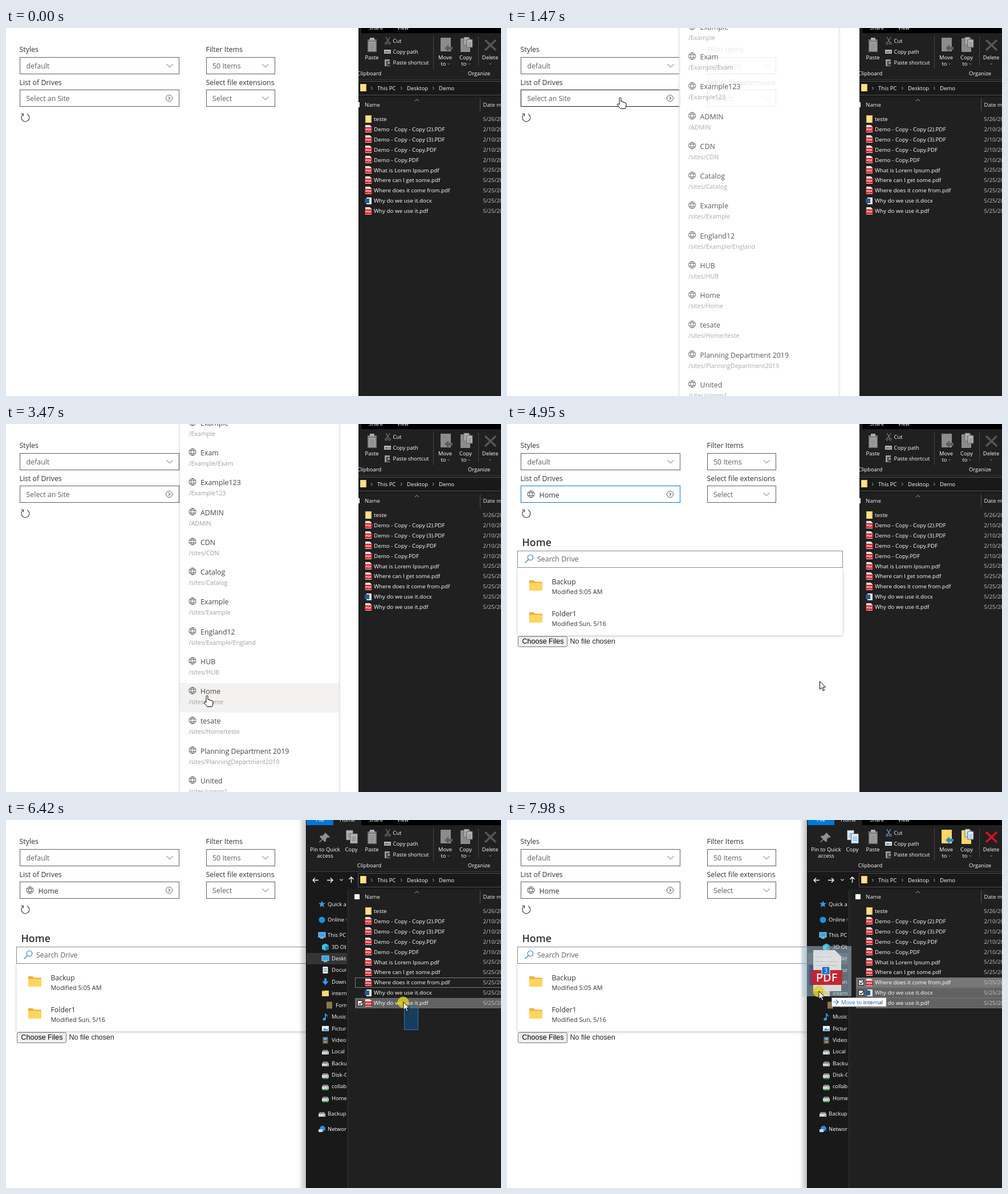
These frames come from a looping animation (868x645 px, 8000 ms). An HTML page:

```html
<!DOCTYPE html>
<html lang="en">
<head>
<meta charset="utf-8">
<style>
  html, body { margin: 0; width: 100%; height: 100%; overflow: hidden; background: #fff; }
  #stage { display: block; width: 868px; height: 645px; font-family: "Open Sans", "Noto Sans", sans-serif;
    --paper: #b4b4b4; --folder: #8c8c8c; --arrow: #5e5e5e; --cross: #565656; --tool: #858585; }
  #stage.enabled { --paper: #dcecf8; --folder: #ffd766; --arrow: #2b88d8; --cross: #d8131f; --tool: #6fb1e4; }
  text { white-space: pre; }
</style>
</head>
<body>
<svg id="stage" viewBox="0 0 868 645"></svg>
<script>
const LOOP = 8000;
const T = { appear: 330, press1: 1200, callout: 1400, press2: 3810, picked: 3900, listed: 4020,
  front: 6140, enabled: 6700, release: 7370, press3: 7600, drag: 7840, hint: 7950 };

// Baselines sit on whole pixels, as hinted screen text does.
const text = (x, y, s, size, fill, more = '') =>
  `<text x="${x}" y="${Math.round(y + size * .36)}" font-size="${size}" fill="${fill}" ${more}>${s}</text>`;
const rect = (x, y, w, h, fill, more = '') =>
  `<rect x="${x}" y="${y}" width="${w}" height="${h}" fill="${fill}" ${more}/>`;
const line = (d, stroke, w = 1, more = '') =>
  `<path d="${d}" fill="none" stroke="${stroke}" stroke-width="${w}" ${more}/>`;
const shape = (d, fill, more = '') => `<path d="${d}" fill="${fill}" ${more}/>`;
const circle = (x, y, r, fill, more = '') => `<circle cx="${x}" cy="${y}" r="${r}" fill="${fill}" ${more}/>`;
const group = (id, body, more = '') => `<g id="${id}" ${more}>${body}</g>`;
const at = (x, y, body) => `<g transform="translate(${x} ${y})">${body}</g>`;
const chevron = (x, y, r, color, w = 1) => line(`M${x - r} ${y - r / 2}l${r} ${r}l${r} ${-r}`, color, w);

// ---- file manager window ----
const ROW = 17.9, ROW0 = 159.5;
const files = ['teste', 'Demo - Copy - Copy (2).PDF', 'Demo - Copy - Copy (3).PDF', 'Demo - Copy - Copy.PDF',
  'Demo - Copy.PDF', 'What is Lorem Ipsum.pdf', 'Where can I get some.pdf', 'Where does it come from.pdf',
  'Why do we use it.docx', 'Why do we use it.pdf'];

const folderTile = (x, y) => rect(x, y, 11, 13, '#e8bf5a') + rect(x + 1, y + 1, 8, 12, '#ffe08c');
const pdfIcon = (x, y) => shape(`M${x + 1} ${y - 7}h8l3 3v10h-11z`, '#e4e4e4') +
  rect(x, y - 3, 13, 8, '#cf1820') +
  text(x + 6.5, y + 1, 'PDF', 5.6, '#fff', 'text-anchor="middle" font-weight="700"');
const docIcon = (x, y) => rect(x + 3, y - 6, 9, 12, '#e4e4e4') + rect(x, y - 4, 8, 8, '#2b579a');

function fileRow(name, i) {
  const y = ROW0 + i * ROW, iconY = Math.round(y);
  const icon = i === 0 ? folderTile(630, iconY - 7) : /docx/.test(name) ? docIcon(629, iconY) : pdfIcon(629, iconY);
  const mark = rect(616.5, iconY - 4.5, 9, 9, '#fff', 'stroke="#111"') + line(`M618.5 ${iconY}l2.200 2.300l4 -5`, '#111', 1.2);
  const date = i === 0 ? '5/26/2021' : i < 5 ? '2/10/2021' : '5/25/2021';
  return `<rect id="bg${i}" x="612.500" y="${Math.round(y - 9) + .5}" width="270" height="17"/>` +
    group('mark' + i, mark) + icon + text(645, y, name, 9.8, '#fff') + text(836.5, y, date, 9.6, '#c4c4c4');
}

const places = [[147.5, 'Quick access', 'star'], [175, 'Online files', 'dot'], [202, 'This PC', 'screen'],
  [222.5, '3D Objects', 'cube', 1], [243, 'Desktop', 'screen', 1], [263, 'Documents', 'page', 1],
  [283.5, 'Downloads', 'down', 1], [304, 'internal', 'folder', 1], [324.5, 'Formats', 'old', 2],
  [345, 'Music', 'note', 1], [365.5, 'Pictures', 'photo', 1], [386, 'Videos', 'film', 1],
  [406, 'Local Disk', 'disk', 1], [426.5, 'Backup', 'disk', 1], [447, 'Disk-C', 'net', 1],
  [467, 'collab', 'net', 1], [488, 'Home', 'net', 1], [515, 'Backup', 'disk'], [542, 'Network', 'globe']];
const drive = rect(-6, 0, 12, 5, '#d5d5d5') + shape('M-6 0l2 -3h8l2 3z', '#8d8d8d') + rect(3, 2, 2, 1.500, '#3a3');
const glyphs = {
  star: shape('M0 -6L1.700 -2H6L2.600 1L4 5.500L0 3L-4 5.500L-2.600 1L-6 -2H-1.700Z', '#3a9be8'),
  dot: circle(0, 0, 5.500, '#1e8fe0'),
  screen: rect(-6, -5, 12, 8.500, '#31a8f0', 'stroke="#9bd4f7"') + rect(-3, 4.500, 6, 1.500, '#ccc'),
  cube: shape('M0 -6L6 -3V4L0 6.500L-6 4V-3Z', '#3fc0e0') + shape('M0 0L6 -3V4L0 6.500Z', '#1583a8'),
  page: rect(-4.500, -6, 9, 12, '#e9eef2') + line('M-2.500 -2.500h5M-2.500 0h5M-2.500 2.500h5', '#3f86b8'),
  down: shape('M-2 -6h4v5h4L0 6L-6 -1h4z', '#3099ea'),
  folder: rect(-6, -5, 12, 10, '#ffd978') + rect(-6, -5, 5, 2, '#d9a73c'),
  old: rect(-5, -6, 10, 12, '#85794d'),
  note: circle(-2, 4, 2.600, '#2b9df0') + line('M0 4V-6Q1 -3 4 -1', '#2b9df0', 1.700),
  photo: rect(-6, -4.500, 12, 9, '#e6f3fa') + shape('M-5 3.500L-1 -1L2 2L4 0L5 3.500Z', '#3c92b8'),
  film: rect(-5, -6, 10, 12, '#555') + rect(-3, -4.500, 6, 4, '#7aa6d8') + rect(-3, 1, 6, 4, '#a5824c'),
  disk: drive,
  net: drive + line('M0 4v2M-5 6h10', '#37b24d', 1.500),
  globe: circle(1, -1, 5, '#2c8ae0') + rect(-6, 0, 7, 5, '#bcdcf5')
};
const place = ([y, label, kind, depth = 0]) =>
  at([554, 560, 567][depth], y, glyphs[kind]) + text([564, 571, 578][depth], y, label, 9.5, '#fff');

const mid = 'text-anchor="middle"';
const label = (x, y, s) => text(x, y, s, 9.4, '#fff', mid);
const sheet = (x, y, w, h) => rect(x, y, w, h, 'var(--paper)', 'stroke="#555" stroke-width=".8"') +
  line(`M${x + 2.500} ${y + 6}h${w - 5}m0 3h${5 - w}m0 3h${w - 5}`, 'var(--arrow)', .8);

const ribbon = rect(526, 0, 342, 9, '#000') + rect(526, 0, 48, 9, '#0078d7') + rect(574, 0, 49, 9, '#202020') +
  label(550.5, 0, 'File') + label(598.5, 0, 'Home') + label(648.5, 0, 'Share') + label(696, 0, 'View') +
  at(559, 31, shape('M1 -9l8 8l-2 1l-2 -.500l-3 3l0 4l-2 1l-4 -4l-5 5l-1 -1l5 -5l-4 -4l1 -2h4l3 -3z', '#909090')) +
  sheet(596.5, 18, 12, 17) + sheet(603.5, 24, 13, 17) +
  rect(634, 20, 16, 22, '#777') + rect(638, 17, 8, 5, '#aaa') + rect(636, 24, 12, 16, '#a2a2a2') +
  line('M638 28h8m0 3h-8m0 3h8m0 3h-8', '#777') +
  line('M666 16l6 10M673 16l-6 10', 'var(--tool)', 1.1) + circle(666.5, 27, 1.800, 'none', 'stroke="var(--tool)"') +
  circle(672.5, 27, 1.800, 'none', 'stroke="var(--tool)"') +
  rect(663, 38, 12, 7, 'var(--paper)') + line('M665 42h5m1 0h2', '#444', 1.5) +
  rect(664, 55, 9, 12, '#9a9a9a') + rect(667, 58, 7, 8, '#333') + line('M668 64l4 -4m-3 0h3v3', '#ddd') +
  text(678.5, 23, 'Cut', 9.4, '#fff') + text(678.5, 42, 'Copy path', 9.4, '#fff') +
  text(678.5, 60.5, 'Paste shortcut', 9.4, '#fff') +
  label(559.5, 52, 'Pin to Quick') + label(559.5, 63, 'access') + label(605.5, 52, 'Copy') + label(641.5, 52, 'Paste') +
  rect(762, 17, 18, 24, 'var(--folder)') + shape('M769 35l7 -6v4h7v5h-7v4z', 'var(--arrow)') +
  rect(797, 18, 17, 24, 'var(--folder)') + sheet(803, 16, 9, 14) + sheet(808, 20, 10, 14) +
  line('M840 21l19 18M859 21l-19 18', 'var(--cross)', 3.600) +
  label(770, 52, 'Move') + label(767, 63, 'to') + label(806, 52, 'Copy') + label(803, 63, 'to') + label(849, 52, 'Delete') +
  [776, 812, 849].map(x => chevron(x, 63, 1.500, '#aaa')).join('') +
  label(637, 80, 'Clipboard') + label(829.5, 80, 'Organize') +
  line('M749.5 13V72M828.5 15V66', '#454545');

const address = rect(526, 90, 342, 31, '#191919') + line('M526 90.5H868', '#3a3a3a') +
  rect(617.5, 93.5, 270, 24, '#191919', 'stroke="#505050"') +
  line('M548 105.5h-10m4 -4l-4 4l4 4M563 105.5h10m-4 -4l4 4l-4 4M605.5 110v-10m-4 4l4 -4l4 4', '#fff', 1.3) +
  chevron(588, 105, 2.500, '#ccc', 1.2) + folderTile(621, 98) +
  [641, 693, 749].map(x => line(`M${x - 1} 103l2.500 2.500l-2.500 2.500`, '#bbb')).join('') +
  text(651, 105.5, 'This PC', 9.65, '#fff') + text(703, 105.5, 'Desktop', 9.65, '#fff') + text(759, 105.5, 'Demo', 9.65, '#fff');

const explorer = rect(526, 0, 342, 645, '#202020') + ribbon + address +
  rect(526, 121, 73, 524, '#191919') + rect(526, 233, 72, 20, '#353535') + line('M599.5 124V645', '#353535') +
  `<svg width="597" height="645">${places.map(place).join('')}</svg>` +
  rect(611, 130, 9, 9, '#fff') + text(629, 135, 'Name', 9.6, '#eee') + text(836.5, 135, 'Date modified', 9.6, '#eee') +
  line('M717 128l3.500 -3l3.500 3', '#aaa') + line('M831.5 124V146', '#555') +
  files.map(fileRow).join('') +
  '<rect id="lasso" fill="#0078d7" fill-opacity=".33" stroke="#2b7cc4"/>' + line('M526.5 0V645', '#0c0c0c');

// ---- web page ----
const INK = '#323130', SOFT = '#605e5c', BORDER = '#605e5c';
const globe = (x, y) => at(x, y, circle(0, 0, 6, 'none', 'stroke="#555"') +
  line('M0 -6Q-5.500 0 0 6Q5.500 0 0 -6M-5.300 -2.500H5.300M-5.300 2.500H5.300', '#555', .9));
const box = (x, y, w, more = '') => rect(x + .5, y + .5, w - 1, 29, '#fff', `stroke="${BORDER}" ${more}`);
const folder = y => shape(`M39 ${y}h8l2 2.500h13v15h-23z`, '#e9b23d') + rect(39, y + 4.500, 23, 13.500, '#ffd45f', 'rx="1"');
const entry = (y, name, info) => folder(y - 3) + text(78.5, y, name, 12.3, INK) + text(78.5, y + 16.7, info, 10.9, INK);

const sites = [['Example', '/Example'], ['Exam', '/Example/Exam'], ['Example123', '/Example123'], ['ADMIN', '/ADMIN'],
  ['CDN', '/sites/CDN'], ['Catalog', '/sites/Catalog'], ['Example', '/sites/Example'],
  ['England12', '/sites/Example/England'], ['HUB', '/sites/HUB'], ['Home', '/sites/Home'],
  ['tesate', '/sites/Home/teste'], ['Planning Department 2019', '/sites/PlanningDepartment2019'], ['United', '/sites/comm1']];
const SITE = 52.25, SITE0 = -1.7;
const siteRow = ([name, path], i) => {
  const y = SITE0 + i * SITE;
  return globe(327, y - 1.300) + text(341, y, name, 12.4, '#484644') + text(320.5, y + 18.8, path, 10.7, '#a19f9d');
};

const windowShadow = '<linearGradient id="fade"><stop stop-opacity="0"/><stop offset="1" stop-opacity=".24"/></linearGradient>' +
  rect(513, 0, 13, 645, 'url(#fade)', 'id="shadow"');

const page = rect(0, 0, 618, 645, '#fff') +
  text(23.5, 38, 'Styles', 12.4, INK) + text(350.5, 38, 'Filter Items', 12.4, INK) +
  text(23.5, 96, 'List of Drives', 12.4, INK) + text(350.5, 96, 'Select file extensions', 12.4, INK) +
  box(24, 51, 280) + box(351, 51, 121) + box(24, 108, 280, 'id="drives"') + box(351, 108, 121) +
  text(35.5, 67, 'default', 12.4, SOFT) + text(362, 67, '50 Items', 12.4, SOFT) + text(362, 124, 'Select', 12.4, SOFT) +
  chevron(287, 66, 5.500, SOFT) + chevron(455, 66, 5.500, SOFT) + chevron(455, 123, 5.500, SOFT) +
  circle(286, 123, 5.500, 'none', `stroke="${SOFT}"`) + line('M285 120.500l2.500 2.500l-2.500 2.500', SOFT, 1.1) +
  line('M29.500 151.600A7 7 0 1 0 37 150.700M26.500 150.500h4v4', INK, 1.1) +
  group('noSite', text(35.5, 124, 'Select an Site', 12.4, SOFT)) +
  group('hasSite', globe(42, 123) + text(56.5, 124.5, 'Home', 12.4, INK)) +
  group('listing', text(26.5, 208, 'Home', 17.8, INK, 'font-weight="600"') +
    rect(18.5, 252, 570, 118.5, '#fff', 'style="filter:drop-shadow(0 1.500px 2px #0004)"') +
    rect(18.5, 222.5, 570, 29, '#fff', 'stroke="#8a8886"') +
    circle(41, 234, 4.800, 'none', 'stroke="#2b7cc4" stroke-width="1.100"') + line('M37.500 237.500l-6 6', '#2b7cc4', 1.2) +
    text(53, 237, 'Search Drive', 12.4, SOFT) +
    entry(277, 'Backup', 'Modified 5:05 AM') + entry(333, 'Folder1', 'Modified Sun, 5/16') +
    rect(19.5, 372.5, 86, 18, '#efefef', 'stroke="#767676" rx="2"') +
    `<g font-family="Liberation Sans, Arial, sans-serif">${text(26.5, 380.8, 'Choose Files', 12.5, '#000') +
      text(110.5, 380.8, 'No file chosen', 12.5, '#222')}</g>`) +
  group('callout', rect(304.500, -5, 280, 655, '#fff', 'stroke="#e1dfdd" style="filter:drop-shadow(0 1px 2px #0002)"') +
    rect(305, 0, 279, 51.500, '#f3f2f1', 'id="siteHover"') + sites.map(siteRow).join('')) + windowShadow;

// ---- pointer and dragged files, both relative to the hot spot ----
const dragged = rect(-30, -79, 87, 88, '#a9cbdc', 'opacity=".5"') + rect(-17, -46, 10, 36, '#2b579a', 'opacity=".8"') +
  `<g opacity=".9">${shape('M-10 -72h38l11 11v61h-49z', '#e6e6e6') + line('M-6 -60h30m8 8h-38m0 7h38', '#c4c4c4') +
    rect(-14, -37, 55, 26, '#c9202a') +
    text(13.5, -24, 'PDF', 20, '#fff', mid + ' font-weight="600"')}</g>` +
  rect(5, -43, 14, 14, '#1572c8', 'stroke="#fff"') + text(12, -36, '3', 10, '#fff', mid);
const hint = rect(22.5, 11.5, 95.5, 15.5, '#fff', 'stroke="#999"') + line('M25 19h9m-4 -4l4 4l-4 4', '#2b6cc4', 1.1) +
  `<text x="39" y="22.500" font-size="9.600" fill="#2b6cc4">Move to <tspan fill="#12307c">internal</tspan></text>`;
const outline = 'stroke="#000" stroke-width="1" stroke-linejoin="round"';
const pointer = group('dragged', dragged) + circle(-.5, .5, 10, '#e3d21c', 'id="press" opacity=".8"') +
  group('arrow', shape('M0 0V14L3.300 11L5.700 16.500L8 15.500L5.600 10.200H10Z', '#fff', outline)) +
  group('hand', shape('M-2 10V1.500Q-2 0 -.500 0T1 1.500V7Q3.500 6 4 8Q6.500 7 7 9Q9.500 8.500 10 11V14Q10 17 8 19.500H0Q-2 17 -6 12Q-5 9.500 -2 12Z', '#fff', outline)) +
  group('hint', hint);

const stage = document.getElementById('stage');
stage.innerHTML = explorer + `<svg id="page" width="618" height="645">${page}</svg>` + group('pointer', pointer);

const $ = id => document.getElementById(id);
const show = (id, on) => $(id).setAttribute('visibility', on ? 'visible' : 'hidden');
const set = (id, attrs) => { for (const k in attrs) $(id).setAttribute(k, attrs[k]); };

const path = [[330, 799, 634], [600, 560, 400], [900, 270, 190], [1130, 199, 122], [2440, 199, 122], [2800, 292, 230],
  [3050, 368, 455], [3190, 331, 409], [3330, 357, 475], [3470, 353, 476], [4530, 353, 474], [4950, 548.5, 451],
  [5330, 701, 416], [5410, 702, 414], [5950, 722.5, 367.5], [6140, 722.5, 367.5], [6360, 698.5, 327.5], [6420, 697, 319],
  [6780, 702, 283], [7370, 702, 283], [7600, 715, 284.5], [7839, 715, 284.5], [7840, 668, 289], [7980, 547, 300]];

function cursorAt(t) {
  const i = path.findIndex(p => p[0] > t);
  if (i < 1) return path.at(i).slice(1);
  const [t0, x0, y0] = path[i - 1], [t1, x1, y1] = path[i];
  const k = (t - t0) / (t1 - t0);
  return [x0 + (x1 - x0) * k, y0 + (y1 - y0) * k];
}

function drawPage(t, x, y, overDrives, overSites) {
  const front = t >= T.front;
  set('page', { width: front ? 526 : 618 });
  show('shadow', front);
  const focused = t >= T.picked && !front;
  set('drives', { stroke: focused ? '#0078d4' : overDrives ? '#1b1a19' : BORDER });
  show('noSite', t < T.picked);
  show('hasSite', t >= T.picked);
  show('listing', t >= T.listed);

  const open = t >= T.callout && t < T.picked;
  const eased = 1 - (1 - Math.min(1, Math.max(0, (t - T.callout) / 300))) ** 8;
  show('callout', open);
  set('callout', { opacity: eased, transform: `translate(${-20 * (1 - eased)} 0)` });
  const row = Math.floor((y - SITE0 + 14.5) / SITE);
  set('siteHover', { y: SITE0 - 14.5 + row * SITE, opacity: overSites ? 1 : 0 });
}

function drawExplorer(t, x, y) {
  const front = t >= T.front, lassoing = front && t < T.release;
  const [lx, ly] = cursorAt(Math.min(t, T.release) - 60); // the selection box trails the pointer
  const left = Math.min(lx, 722), top = Math.min(ly, 367);
  show('lasso', lassoing);
  set('lasso', { x: left, y: top, width: 722.5 - left, height: 367.5 - top });
  const hovered = lassoing ? -1 : x > 612 ? Math.round((y - ROW0) / ROW) : 7;
  files.forEach((_, i) => {
    const selected = front && top < ROW0 + (i + .5) * ROW;
    set('bg' + i, {
      fill: !selected ? 'none' : i === hovered ? '#777' : '#626262',
      stroke: !front ? 'none' : selected ? '#6e6e6e' : i === 7 ? '#7a7a7a' : 'none'
    });
    show('mark' + i, selected);
  });
  stage.classList.toggle('enabled', t >= T.enabled);
}

function draw(t) {
  const [x, y] = cursorAt(t);
  const overDrives = t >= T.appear && t < T.picked && x > 24 && x < 304 && y > 108 && y < 138;
  const overSites = t >= T.callout && t < T.picked && x > 305 && x < 584;
  drawPage(t, x, y, overDrives, overSites);
  drawExplorer(t, x, y);
  set('pointer', { transform: `translate(${x} ${y})`, opacity: t < T.appear ? 0 : 1 });
  const hand = overDrives || overSites;
  show('hand', hand);
  show('arrow', !hand);
  show('press', (t >= T.press1 && t < 1330) || (t >= T.press2 && t < T.picked) ||
    (t >= T.front && t < T.release) || t >= T.press3);
  show('dragged', t >= T.drag);
  show('hint', t >= T.hint);
}

let start;
function tick(now) {
  start ??= now;
  draw((now - start) % LOOP);
  requestAnimationFrame(tick);
}
draw(0);
requestAnimationFrame(tick);
</script>
</body>
</html>
```
